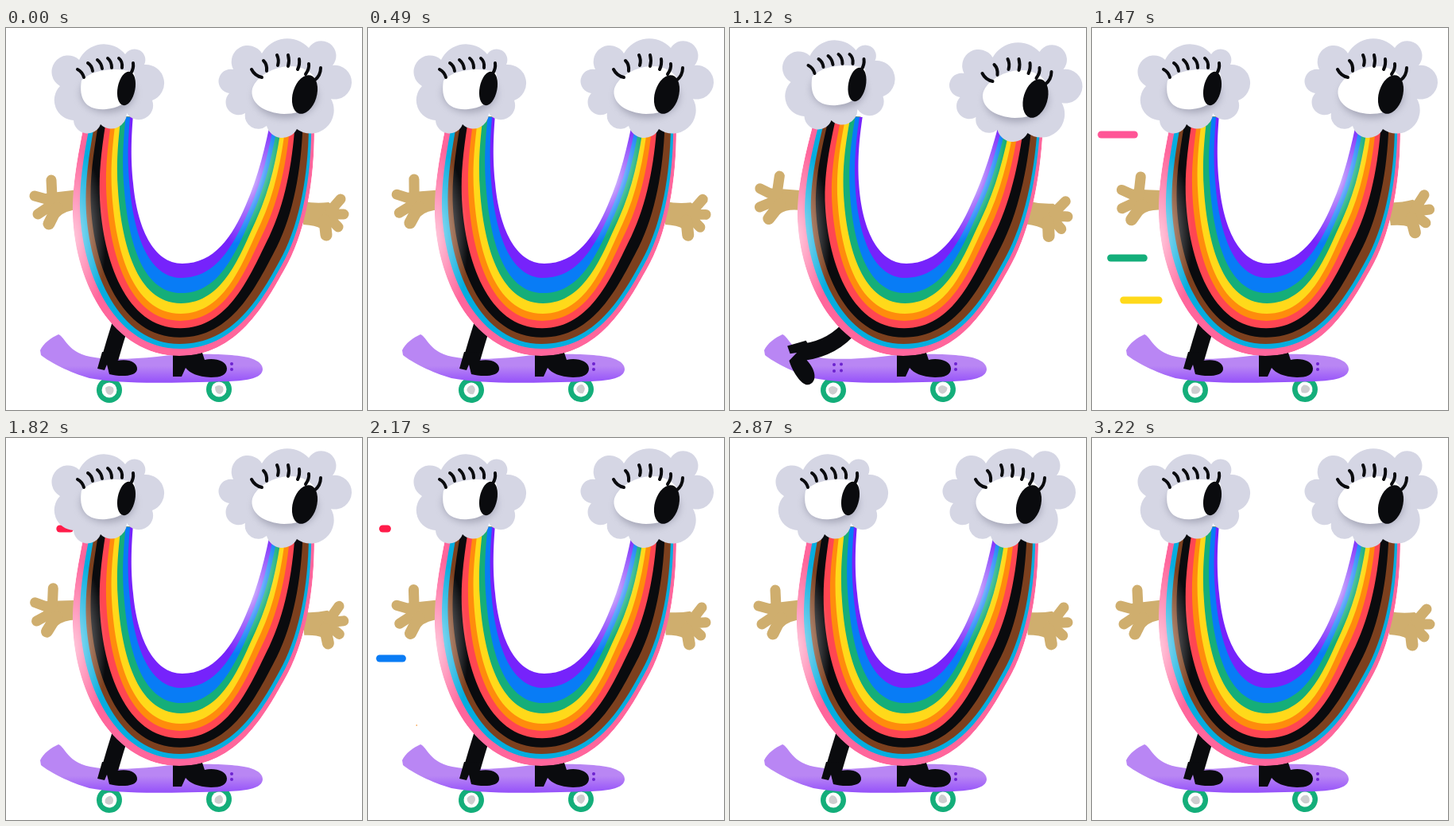
Animation of 448 by 480 pixels, one loop 3290 ms. Source, as an HTML page:

```html
<!DOCTYPE html>
<html lang="en">
<head>
<meta charset="utf-8">
<title>Rainbow skater</title>
<style>
  html, body { margin: 0; width: 100%; height: 100%; overflow: hidden; background: #fff; }
  svg { display: block; width: 448px; height: 480px; }
  .hand { fill: #cfae6e; stroke: #cfae6e; stroke-linecap: round; stroke-linejoin: round; }
  .lash { fill: none; stroke: #0a0b0e; stroke-width: 4; stroke-linecap: round; }
  .cloud { fill: #d5d6e4; }
  .shade { fill: #77788c; opacity: .5; filter: url(#soft); }
  .ink { fill: #0a0b0e; }
  .dots { fill: #6c22cf; }
</style>
</head>
<body>
<svg viewBox="0 0 448 480" xmlns="http://www.w3.org/2000/svg">
  <defs>
    <filter id="soft" x="-30%" y="-30%" width="160%" height="160%"><feGaussianBlur stdDeviation="5"/></filter>
    <linearGradient id="deck" x1="0" y1="385" x2="0" y2="446" gradientUnits="userSpaceOnUse">
      <stop offset=".65" stop-color="#b986f4"/><stop offset="1" stop-color="#9450fa"/>
    </linearGradient>
    <radialGradient id="glow">
      <stop offset="0" stop-color="#fff" stop-opacity=".65"/>
      <stop offset=".45" stop-color="#fff" stop-opacity=".35"/>
      <stop offset="1" stop-color="#fff" stop-opacity="0"/>
    </radialGradient>
    <clipPath id="bodyClip"><path id="clipShape"/></clipPath>
    <g id="wheel">
      <circle r="16" fill="#14ae7a"/><circle r="9.5" fill="#fff"/>
      <path d="M-5,-3 Q0,-7 5,-3 Q7,3 2,6 Q-5,6 -5,-3Z" fill="#cdcdcf"/>
    </g>
  </defs>

  <g id="lines"></g>

  <g id="handL" class="hand">
    <path stroke="none" d="M92,203 L66,206 L50,208 L48,232 L66,238 Q74,229 92,228Z"/>
    <path stroke-width="13" d="M57,191 L58,212 M36,211 L58,217 M40,234 L58,222"/>
    <path stroke-width="15" d="M54,246 L64,226"/>
  </g>
  <g id="handR" class="hand">
    <path stroke="none" d="M374,218 Q390,221 406,219 L416,226 L412,248 L396,252 Q390,248 374,247Z"/>
    <path stroke-width="13" d="M421,215 L408,230 M425,234 L406,234 M418,250 L406,238"/>
    <path stroke-width="15" d="M403,260 L401,242"/>
  </g>

  <g id="wheelL"><use href="#wheel"/></g>
  <g id="wheelR"><use href="#wheel"/></g>
  <path fill="url(#deck)" d="M43,405 C47,396 57,389 66,385 C72,387 77,401 91,408 C110,418 150,417 190,413 C230,408 290,409 308,415 C320,419 323,424 323,429 C322,440 305,443 280,444 C200,446 150,448 105,440 C80,433 55,420 44,411Z"/>
  <g class="dots">
    <circle cx="131" cy="423" r="2"/><circle cx="140" cy="422.500" r="2"/>
    <circle cx="131" cy="431" r="2"/><circle cx="140" cy="430.500" r="2"/>
    <circle cx="284" cy="422" r="2"/><circle cx="284" cy="429" r="2"/>
  </g>

  <path id="leg" fill="none" stroke="#0a0b0e" stroke-width="21"/>
  <path id="foot" class="ink" d="M-10,-8 L11,-7 L9,3 C23,0 35,5 34,14 C33,24 10,23 -1,20 L-4,8 L-7,15 L-16,13Z"/>
  <path class="ink" d="M210,404 L210,438 L221,438 L226,427 C232,434 240,438 258,439 C270,439 278,436 278,428 C278,418 262,414 250,417 L245,402Z"/>

  <g clip-path="url(#bodyClip)">
    <g id="bands"></g>
    <ellipse cx="84" cy="265" rx="42" ry="115" fill="url(#glow)"/>
    <ellipse cx="311" cy="196" rx="23" ry="80" transform="rotate(20 311 196)" fill="url(#glow)"/>
  </g>
  <path id="gap" fill="#fff"/>

  <g id="eyeL">
    <path id="cloudL" class="cloud"/>
    <ellipse class="shade" cx="128" cy="82" rx="34" ry="24"/>
    <path fill="#fff" d="M95,66 C108,52 140,48 161,56 C167,75 155,100 126,102 C101,104 91,90 95,66Z"/>
    <ellipse class="ink" cx="151.500" cy="76" rx="11" ry="21.500" transform="rotate(11 151.500 76)"/>
    <path class="lash" d="M90,52 Q96,55 98,62 M103,44 Q108,47 109,54 M115,40 Q120,44 121,51 M128,38 Q133,42 133,50 M142,38 Q147,42 146,50 M160,44 Q161,51 157,57"/>
  </g>
  <g id="eyeR">
    <path id="cloudR" class="cloud"/>
    <ellipse class="shade" cx="352" cy="86" rx="40" ry="27"/>
    <path fill="#fff" d="M310,76 C316,58 345,44 368,49 C383,53 392,62 392,76 C392,96 375,108 350,108 C325,107 306,94 310,76Z"/>
    <ellipse class="ink" cx="376" cy="83.500" rx="15" ry="25" transform="rotate(17 376 83.500)"/>
    <path class="lash" d="M309,52 Q313,60 322,62 M324,41 Q329,46 328,54 M341,34 Q344,40 342,47 M355,34 Q357,41 355,48 M369,39 Q370,46 367,52 M381,45 Q382,51 377,58 M396,50 Q396,60 388,66"/>
  </g>
</svg>
<script>
const LOOP = 3290, STEP = 70;
const $ = id => document.getElementById(id);
const set = (el, name, value) => el.setAttribute(name, value);
const mix = (a, b, p) => a + (b - a) * p;
const clamp = v => Math.min(1, Math.max(0, v));
const easeOut = v => 1 - (1 - clamp(v)) ** 2;

function add(parent, tag, fill) {
  const el = document.createElementNS('http://www.w3.org/2000/svg', tag);
  set(el, 'fill', fill);
  return parent.appendChild(el);
}

// Piecewise linear value from [time, value] pairs
function track(t, keys) {
  let i = 1;
  while (i < keys.length - 1 && keys[i][0] < t) i++;
  const [a, u] = keys[i - 1], [b, v] = keys[i];
  return mix(u, v, clamp((t - a) / (b - a)));
}

// Closed outline of arcs; each entry is a valley and the bulge leading to it
function scallop(lobes) {
  let [x, y] = lobes[lobes.length - 1], d = `M${x},${y}`;
  for (const [nx, ny, sag] of lobes) {
    const half = Math.hypot(nx - x, ny - y) / 2;
    const r = (half * half + sag * sag) / (2 * sag);
    d += `A${r},${r} 0 ${sag > half ? 1 : 0} 1 ${nx},${ny}`;
    [x, y] = [nx, ny];
  }
  return d + 'Z';
}
set($('cloudL'), 'd', scallop([
  [150, 33, 16], [174, 46, 13], [184, 91, 20], [152, 107, 16], [119, 121, 12],
  [85, 116, 14], [68, 73, 15], [92, 40, 23]]));
set($('cloudR'), 'd', scallop([
  [381, 25, 15], [411, 47, 20], [409, 89, 25], [366, 127, 23], [328, 123, 13],
  [301, 107, 11], [281, 82, 14], [286, 52, 16], [322, 32, 20]]));

const outer = [[101, 108], [90, 160], [83, 198], [84, 235], [87, 322], [135, 412], [218, 412],
  [290, 412], [325, 350], [355, 295], [378, 250], [388, 190], [388, 128]];
const inner = [[161, 98], [157, 140], [157, 165], [160, 195], [165, 250], [185, 296], [222, 296],
  [262, 296], [285, 262], [302, 222], [318, 185], [326, 150], [334, 112]];

// Start of each stripe between outer and inner edge: left side, bottom, right side
const stripes = [
  ['#ff669c', 0, 0, 0], ['#05addf', .12, .078, .07], ['#7c401e', .22, .13, .13],
  ['#0a0b0e', .30, .20, .27], ['#ff4652', .45, .30, .45], ['#ff8c0c', .56, .38, .56],
  ['#ffd91a', .65, .457, .66], ['#15ae79', .75, .57, .75], ['#087cf6', .85, .68, .84],
  ['#7623fb', .94, .845, .92]
].map(([fill, ...cut]) => ({ el: add($('bands'), 'path', fill), cut }));

function arch([left, low, right], lean) {
  const pts = outer.map(([x, y], i) => {
    const p = i < 5 ? left : i < 8 ? low : right;
    const px = mix(x, inner[i][0], p), py = mix(y, inner[i][1], p);
    const up = Math.max(0, 300 - py) / 190;
    return `${px + 7 * lean * up * up},${py}`;
  });
  return `M${pts[0]}C${pts.slice(1).join(' ')}Z`;
}

// colour, y, right end, left end, start time
const streaks = [
  ['#ff5596', 134, 81, 5, 1190], ['#14ae7a', 289, 93, 17, 1190], ['#ffd91a', 342, 113, 33, 1190],
  ['#ff1c4a', 114, 85, 14, 1764], ['#0a7cf5', 277, 83, 10, 1852], ['#f58a1e', 361, 62, 8, 2165]
].map(([fill, y, from, to, start]) => ({ el: add($('lines'), 'rect', fill), y, from, to, start }));

function drawStreak(s, t) {
  const u = (t - s.start) / 560;
  const head = mix(s.from, s.to, easeOut(u / .6));
  const tail = mix(s.from, s.to, easeOut((u - .4) / .6));
  const w = tail - head, h = Math.min(9, w);
  set(s.el, 'x', head);
  set(s.el, 'y', s.y - h / 2);
  set(s.el, 'width', w);
  set(s.el, 'height', h);
  set(s.el, 'rx', h / 2);
}

function drawLeg(t) {
  const at = (rest, push, kick) =>
    track(t, [[490, rest], [840, push], [1120, kick], [1400, rest]]);
  const x = at(131, 117, 94), y = at(415, 417, 407);
  set($('leg'), 'd', `M${at(144, 147, 153)},${at(372, 376, 374)} Q${at(137, 134, 130)},${at(394, 396, 402)} ${x},${y}`);
  set($('foot'), 'transform', `translate(${x} ${y}) rotate(${at(0, 24, 58)}) scale(${at(1, 1.16, 1.12)})`);
}

function draw(t) {
  const lean = track(t, [[490, 0], [840, .73], [1120, 1], [1400, 0]]);
  for (const { el, cut } of stripes) set(el, 'd', arch(cut, lean));
  set($('clipShape'), 'd', arch([0, 0, 0], lean));
  set($('gap'), 'd', arch([1, 1, 1], lean));
  set($('eyeL'), 'transform', `translate(${8.5 * lean} ${-5 * lean})`);
  set($('eyeR'), 'transform', `translate(${8.5 * lean} ${5 * lean})`);

  const left = track(t, [[0, 0], [420, 1], [840, 8], [1120, 11], [1470, 9], [2170, 1], [2870, 0]]);
  const right = track(t, [[0, 0], [420, 0], [840, 3], [1120, 4], [1470, -8], [2170, -3], [2870, -3], [3220, 0]]);
  set($('handL'), 'transform', `rotate(${left} 85 216)`);
  set($('handR'), 'transform', `rotate(${right} 382 234)`);

  const spin = t / LOOP * 1440;
  set($('wheelL'), 'transform', `translate(130 455) rotate(${spin})`);
  set($('wheelR'), 'transform', `translate(268 454) rotate(${spin})`);
  drawLeg(t);
  for (const s of streaks) drawStreak(s, t);
}

function tick() {
  draw(Math.floor(performance.now() % LOOP / STEP) * STEP);
  requestAnimationFrame(tick);
}
tick();
</script>
</body>
</html>
```
